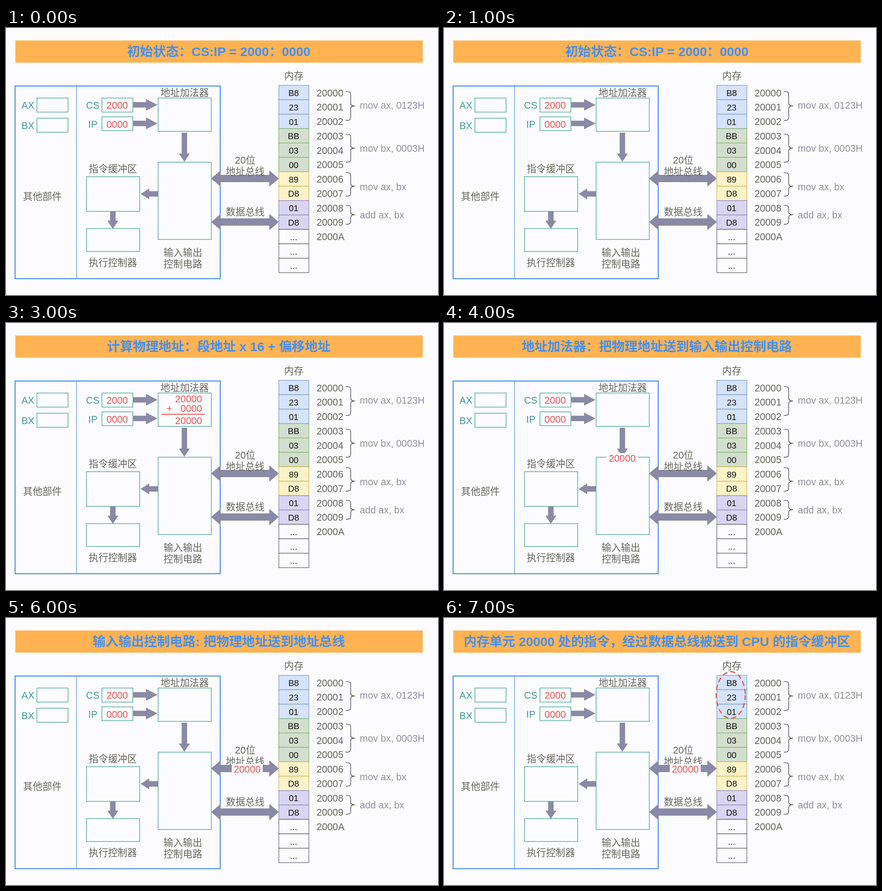
Recreate the animation shown at these times as an HTML page. Size 950x589 px, loop 8000 ms.

```html
<!DOCTYPE html>
<html lang="zh-CN">
<head>
<meta charset="utf-8">
<style>
  html, body { margin: 0; width: 100%; height: 100%; overflow: hidden; background: #fcfcff; }
  svg { display: block; width: 100vw; height: 100vh; }
  text { font: 21.2px "Liberation Sans", "Noto Sans CJK SC", "Noto Sans CJK", sans-serif; white-space: pre; }
  .title { font-size: 28.3px; font-weight: bold; fill: #4490f2; }
  .label, .address { fill: #65655b; }
  .reg { fill: #3d9a9c; }
  .value { fill: #ee5350; }
  .code { fill: #9090a2; }
  .cell { font-size: 19px; fill: #111; }
  .box { fill: none; stroke: #4ca697; stroke-width: 1.4; }
  .arrow { fill: #8a89a6; }
  .brace { fill: none; stroke: #333; stroke-width: 1.2; }
</style>
</head>
<body>
<svg id="stage" viewBox="0 0 950 589"></svg>
<script>
const LOOP = 8000;
const RED = '#ee5350', BLUE = '#438ff3';

// y is the vertical middle of the glyphs
const text = (cls, x, y, s, anchor = 'middle', drop = 7.5) =>
  `<text class="${cls}" x="${x}" y="${y + drop}" text-anchor="${anchor}">${s}</text>`;
const rect = (x, y, w, h, attrs) =>
  `<rect x="${x}" y="${y}" width="${w}" height="${h}" ${attrs}/>`;
const box = (x, y, w, h) => rect(x, y, w, h, 'class="box"');

// Arrow starting at x, y and pointing right before rotation
function arrow(x, y, angle, length, head = 18, half = 12, shaft = 6) {
  const neck = length - head;
  return `<path class="arrow" transform="translate(${x} ${y}) rotate(${angle})"
    d="M0 ${-shaft}H${neck}V${-half}L${length} 0L${neck} ${half}V${shaft}H0z"/>`;
}
const doubleArrow = y =>
  arrow(525.5, y, 0, 74.5, 21, 18, 8) + arrow(526, y, 180, 75, 21, 18, 8);

const brace = (top, mid, bottom) => `<path class="brace" d="M747 ${top}
  C757 ${top} 758 ${top + 2} 758 ${top + 8}V${mid - 7}C758 ${mid - 1} 761 ${mid} 768 ${mid}
  C761 ${mid} 758 ${mid + 1} 758 ${mid + 7}V${bottom - 8}C758 ${bottom - 2} 757 ${bottom} 747 ${bottom}"/>`;

function memory() {
  const bytes = 'B8 23 01 BB 03 00 89 D8 01 D8 ... ... ...'.split(' ');
  const groups = [
    { end: 3, fill: '#d6e3fc', line: '#7f9fcf' },
    { end: 6, fill: '#d3dfce', line: '#83b26c' },
    { end: 8, fill: '#fdf3c8', line: '#d8b35b' },
    { end: 10, fill: '#dad5f2', line: '#8c84bb' },
    { end: 13, fill: '#fcfcff', line: '#666673' },
  ];
  return bytes.map((byte, i) => {
    const { fill, line } = groups.find(g => i < g.end);
    const y = 126.5 + i * 31.78;
    return rect(600, y, 66, 31.78, `fill="${fill}" stroke="${line}" stroke-width="1.3"`)
      + text('cell', 632.5, y + 16.5, byte, 'middle', 7)
      + (i < 11 ? text('address', 683, 143 + i * 31.76, '2000' + i.toString(16).toUpperCase(), 'start') : '');
  }).join('');
}

const diagram = [
  rect(20.5, 27.5, 896, 49, 'fill="#ffb352"'),
  rect(20, 128, 451, 425, `fill="none" stroke="${BLUE}" stroke-width="2.2"`),
  `<path d="M155 128V553" stroke="${BLUE}" stroke-width="1.2"/>`,

  box(68, 154.5, 68.5, 31), box(68, 199, 68.5, 31),
  box(211, 154.5, 68, 31), box(211, 196, 68, 30.5),
  box(334.5, 154.5, 117, 73.5), box(334.5, 296, 117, 170.5),
  box(177, 328, 117, 76.5), box(177, 442.5, 117, 50.5),

  arrow(280, 169.5, 0, 53, 25, 13), arrow(280, 210.5, 0, 53, 25, 13),
  arrow(392.3, 231, 90, 64), arrow(334, 366, 180, 38, 19),
  arrow(235, 405, 90, 38), doubleArrow(332), doubleArrow(428),

  text('reg', 34, 170.5, 'AX', 'start'), text('reg', 34, 215, 'BX', 'start'),
  text('reg', 176, 170.5, 'CS', 'start'), text('reg', 181, 212, 'IP', 'start'),
  text('value', 244.5, 170.5, '2000'), text('value', 244.5, 212, '0000'),

  ...[
    [633, 105, '内存'], [393, 142, '地址加法器'], [235, 310, '指令缓冲区'],
    [80, 371, '其他部件'], [235, 517, '执行控制器'], [389, 495, '输入输出'],
    [389, 520, '控制电路'], [526, 291, '20位'], [526, 316, '地址总线'], [526, 405, '数据总线'],
  ].map(([x, y, s]) => text('label', x, y, s)),

  memory(),
  ...[
    [140, 172, 204, 170, 'mov ax, 0123H'], [234, 265, 296, 265, 'mov bx, 0003H'],
    [319, 349, 371, 350, 'mov ax, bx'], [391, 412, 433, 412, 'add ax, bx'],
  ].map(([top, mid, bottom, y, s]) => brace(top, mid, bottom) + text('code', 778, y, s, 'start')),
].join('');

const operands = text('value', 431, 167, '20000', 'end') + text('value', 353, 188.5, '+', 'start')
  + text('value', 431, 188.5, '0000', 'end')
  + `<path d="M342 201.5H437" stroke="${RED}" stroke-width="1.8"/>`;
const sum = operands + text('value', 431, 215.5, '20000', 'end');
const packet = (x, y) => rect(x - 34, y - 11, 68, 23, 'fill="#fcfcff"') + text('value', x, y, '20000');
const fetchRing = `<ellipse cx="630.5" cy="170" rx="32" ry="51.5" fill="none"
  stroke="${RED}" stroke-width="2.6" stroke-dasharray="11 7"/>`;

const titles = {
  start: '初始状态：CS:IP = 2000：0000',
  add: '计算物理地址：段地址 x 16 + 偏移地址',
  send: '地址加法器：把物理地址送到输入输出控制电路',
  bus: '输入输出控制电路: 把物理地址送到地址总线',
  fetch: '内存单元 20000 处的指令，经过数据总线被送到 CPU 的指令缓冲区',
};
const steps = [
  { at: 0, title: titles.start, extra: '' },
  { at: 2000, title: titles.add, extra: operands },
  { at: 3000, title: titles.add, extra: sum },
  { at: 4000, title: titles.send, extra: packet(392, 298) },
  { at: 5000, title: titles.send, extra: packet(392, 333) },
  { at: 6000, title: titles.bus, extra: packet(530.5, 333) },
  { at: 7000, title: titles.fetch, extra: packet(530.5, 333) + fetchRing },
];

const stage = document.getElementById('stage');
stage.innerHTML = diagram + '<g id="overlay"></g>';
const overlay = document.getElementById('overlay');
let shown;

function draw(now) {
  const time = now % LOOP;
  const step = steps.filter(s => s.at <= time).pop();
  if (step !== shown) {
    overlay.innerHTML = text('title', 468, 52, step.title, 'middle', 10) + step.extra;
    shown = step;
  }
  requestAnimationFrame(draw);
}
draw(performance.now());
</script>
</body>
</html>
```
